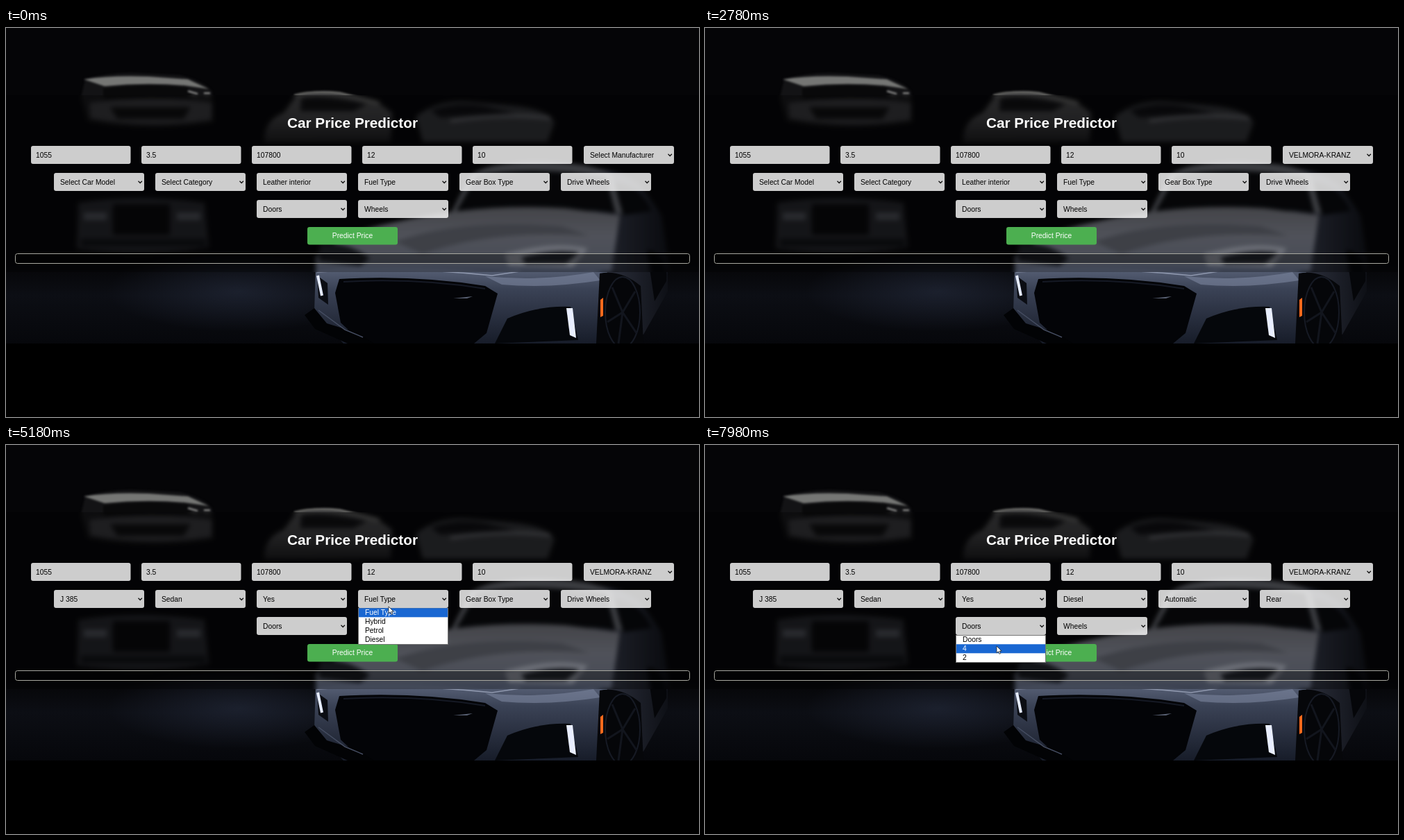
Animation of 998x561 px, one loop 8 s. Source, as an HTML page:

```html
<!DOCTYPE html>
<html lang="en">
<head>
<meta charset="utf-8">
<title>Car Price Predictor</title>
<style>
  html, body { margin: 0; width: 100%; height: 100%; overflow: hidden; background: #000; }
  svg { display: block; width: 998px; height: 561px; }
  text { font: 10.3px "Liberation Sans", Arial, sans-serif; fill: #000; white-space: pre; }
  .title { font-size: 20.75px; font-weight: bold; fill: #fff; text-anchor: middle; }
  .button { fill: #fff; text-anchor: middle; }
  .field { fill: #fff; fill-opacity: .8; }
  .chevron { fill: none; stroke: #111; stroke-width: 1.3; }
  .on { fill: #fff; }
  filter { color-interpolation-filters: sRGB; }
</style>
</head>
<body>
<svg viewBox="0 0 998 561">
  <defs>
    <linearGradient id="floor" x2="0" y2="1">
      <stop offset="0" stop-color="#050507"/><stop offset=".4" stop-color="#0c0e14"/><stop offset="1" stop-color="#06070b"/>
    </linearGradient>
    <radialGradient id="sheen">
      <stop offset="0" stop-color="#222838" stop-opacity=".7"/><stop offset="1" stop-color="#222838" stop-opacity="0"/>
    </radialGradient>
    <linearGradient id="hood" x2="0" y2="1">
      <stop offset="0" stop-color="#606167"/><stop offset=".45" stop-color="#727580"/><stop offset=".75" stop-color="#6a6f7d"/><stop offset="1" stop-color="#565d70"/>
    </linearGradient>
    <linearGradient id="bumper" x2="0" y2="1">
      <stop offset="0" stop-color="#5c657b"/><stop offset=".3" stop-color="#3b4356"/><stop offset="1" stop-color="#171c29"/>
    </linearGradient>
    <linearGradient id="side" x2="1" y2="0">
      <stop offset="0" stop-color="#343846"/><stop offset="1" stop-color="#0e1016"/>
    </linearGradient>
    <linearGradient id="backHood" x2="0" y2="1">
      <stop offset="0" stop-color="#3c3c3d"/><stop offset=".5" stop-color="#313133"/><stop offset="1" stop-color="#151517"/>
    </linearGradient>
    <filter id="soft"><feGaussianBlur stdDeviation="1.4"/></filter>
    <filter id="haze" x="-5%" y="-5%" width="110%" height="110%"><feGaussianBlur stdDeviation="3"/></filter>
    <clipPath id="stage"><rect width="998" height="455"/></clipPath>
    <clipPath id="panel"><rect y="97" width="998" height="255"/></clipPath>

    <g id="photo">
      <rect width="998" height="455" fill="#050507"/>
      <rect y="340" width="998" height="115" fill="url(#floor)"/>
      <ellipse cx="335" cy="380" rx="190" ry="58" fill="url(#sheen)"/>
      <g filter="url(#soft)">
        <!-- parked cars -->
        <path d="M114 74Q150 63 190 65L250 68Q285 76 297 92L298 136Q200 150 118 134L108 100Z" fill="#131315"/>
        <path d="M112 74Q150 68 205 70L262 74L292 88L258 83Q200 78 142 84Z" fill="#757674"/>
        <path d="M140 87Q205 79 262 86L268 100L140 103Z" fill="#09090a"/>
        <path d="M120 108Q205 96 297 108L296 132Q205 146 122 130Z" fill="#2b2b2e"/>
        <path d="M150 114H266L256 131H160Z" fill="#0c0c0d"/>
        <path d="M262 91L276 95M285 94H294" stroke="#a5a5a3" stroke-width="2"/>
        <path d="M418 98Q440 88 480 92L532 105L556 122L554 164L372 165Q370 134 400 122Z" fill="url(#backHood)"/>
        <path d="M415 97Q440 90 482 94L538 108" fill="none" stroke="#858580" stroke-width="2"/>
        <path d="M425 101Q460 95 520 110L500 120H424Z" fill="#0d0d0f"/>
        <path d="M590 128Q620 103 665 106L740 113Q782 119 790 136L780 164H600Z" fill="#27282b"/>
        <path d="M612 119Q650 105 690 113L734 123Q670 127 625 129Z" fill="#0c0c0f"/>
        <path d="M640 134Q720 122 784 130" fill="none" stroke="#515256" stroke-width="4"/>
        <path d="M104 252Q190 238 286 252L292 316Q200 331 102 318Z" fill="#1d1e22"/>
        <path d="M154 254H236V298H154Z" fill="#070709"/>
        <path d="M112 266H145V277H112ZM246 266H280V277H246Z" fill="#3a3c42"/>
        <path d="M108 304H288V315H108Z" fill="#0d0e11"/>
      </g>
      <!-- front car -->
      <path d="M842 202Q890 205 915 228L944 270L953 330V380L918 442L858 450L840 300Z" fill="url(#side)"/>
      <path d="M876 222Q912 225 930 264L888 270Z" fill="#07080b"/>
      <path d="M640 268L668 214Q690 194 760 193Q845 193 872 212L888 268Q760 250 640 268Z" fill="#55575d"/>
      <path d="M648 265L678 212Q760 199 864 214L878 267Q760 253 648 265Z" fill="#08090c"/>
      <path d="M446 330Q480 296 560 280Q680 252 806 260L884 270L872 352H446Z" fill="url(#hood)"/>
      <path d="M560 308Q660 274 800 286L840 300Q700 290 600 326Z" fill="#585b64"/>
      <path d="M452 312Q490 306 524 332L510 343L450 336Z" fill="#1a1c22"/>
      <path d="M718 326Q790 306 838 318L812 350L726 350Z" fill="#9a9eaa"/>
      <path d="M742 331Q790 317 826 324L806 340H748Z" fill="#24272f"/>
      <path d="M446 345Q630 338 866 346L860 455H486L444 410Z" fill="url(#bumper)"/>
      <path d="M690 358Q770 366 846 352L856 364Q780 376 714 370Z" fill="#7c869f" opacity=".6"/>
      <path d="M448 352Q580 344 700 357L740 351" fill="none" stroke="#8f98ae" stroke-width="1.5"/>
      <path d="M480 362Q590 356 690 372L708 383L692 440L674 455H514L482 425L474 382Z" fill="#030407"/>
      <path d="M486 366Q590 360 690 376" fill="none" stroke="#151924" stroke-width="2"/>
      <path d="M644 390L672 387L664 390Z" fill="#596173"/>
      <path d="M448 357L463 368L464 399L450 389Z" fill="#0b0d13"/>
      <path d="M449 357L455 386" fill="none" stroke="#e6ecff" stroke-width="4"/>
      <path d="M722 419Q766 400 813 402L824 450L704 455Z" fill="#05070b"/>
      <path d="M807 404H816L821 447L812 443Z" fill="#e9eeff"/>
      <path d="M430 414L444 404L462 426L508 440L530 455H492L445 434Z" fill="#020305"/>
      <path d="M450 407L488 435L514 446" fill="none" stroke="#454d61" stroke-width="1.5"/>
      <path d="M855 354Q885 348 914 372L918 455H850Z" fill="#06070a"/>
      <ellipse cx="888" cy="410" rx="25" ry="51" fill="#050609" stroke="#161a24" stroke-width="2"/>
      <path d="M888 410L873 374M888 410L906 380M888 410L866 424M888 410L908 440M888 410L882 455" stroke="#12151d" stroke-width="3"/>
      <path d="M923 320Q954 325 951 365L934 394Z" fill="#050609"/>
      <path d="M856 392L860 389V415L856 417Z" fill="#ff6a1c"/>
    </g>
  </defs>

  <rect width="998" height="561"/>
  <g clip-path="url(#stage)"><use href="#photo"/></g>
  <g clip-path="url(#panel)">
    <use href="#photo" filter="url(#haze)"/>
    <rect y="97" width="998" height="255" opacity=".3"/>
  </g>
  <rect x="13.5" y="325.5" width="971" height="14" rx="3" fill="#000" fill-opacity=".3" stroke="#a8a8a0"/>
  <text class="title" x="499" y="144">Car Price Predictor</text>
  <rect x="434" y="287" width="130" height="25.5" rx="3" fill="#4caf50"/>
  <text class="button" x="499" y="303">Predict Price</text>
  <g id="form"></g>
  <g id="ring" fill="none">
    <rect x="-.5" y="-.5" width="131" height="27" rx="3.5" stroke="#fff"/>
    <rect x=".5" y=".5" width="129" height="25" rx="2.5" stroke="#111"/>
  </g>
  <g id="menu"></g>
  <path id="cursor" d="M0 0V10L2.4 7.8L4 11.4L5.7 10.6L4.1 7.2H7.2Z" fill="#fff" stroke="#222" stroke-width=".8"/>
</svg>
<script>
const LOOP = 8000, ROW = 13, WIDTH = 130;
const get = id => document.getElementById(id);

function add(parent, tag, attrs, text = '') {
  const node = document.createElementNS('http://www.w3.org/2000/svg', tag);
  for (const key in attrs) node.setAttribute(key, attrs[key]);
  node.textContent = text;
  return parent.appendChild(node);
}

function addField(x, y, width, pad, text) {
  add(get('form'), 'rect', { class: 'field', x, y, width, height: 26, rx: 3 });
  return add(get('form'), 'text', { x: x + pad, y: y + 16.7 }, text);
}

['1055', '3.5', '107800', '12', '10'].forEach((value, i) => addField(36 + 159 * i, 170, 143.5, 7, value));

// open and pick are times in ms; blur ends the focus ring
const selects = [
  { x: 832, y: 170, open: 900, pick: 1560, blur: 2660, row: 1,
    options: ['Select Manufacturer', 'VELMORA-KRANZ', 'SORENKA', 'MIRUVA', 'KELVO', 'DRAN', 'TARQUINEL', 'QZV'] },
  { x: 69, y: 209, open: 2860, pick: 3280, blur: 3640, row: 1, options: ['Select Car Model', 'J 385', 'J 410', 'L 72'] },
  { x: 215, y: 209, open: 3640, pick: 4000, blur: 4300, row: 1, options: ['Select Category', 'Sedan', 'Hatchback', 'Coupe'] },
  { x: 361, y: 209, open: 4300, pick: 4760, blur: 5040, row: 1, options: ['Leather interior', 'Yes', 'No'] },
  { x: 507, y: 209, open: 5040, pick: 5560, blur: 6020, row: 3, options: ['Fuel Type', 'Hybrid', 'Petrol', 'Diesel'] },
  { x: 653, y: 209, open: 6020, pick: 6420, blur: 6680, row: 1, options: ['Gear Box Type', 'Automatic', 'Manual'] },
  { x: 799, y: 209, open: 6680, pick: 7140, blur: 7560, row: 1, options: ['Drive Wheels', 'Rear', 'Front', '4x4'] },
  { x: 361, y: 248, open: 7560, pick: LOOP, blur: LOOP, row: 1, options: ['Doors', '4', '2'] },
  { x: 507, y: 248, open: LOOP, pick: LOOP, blur: LOOP, row: 0, options: ['Wheels'] }
];

for (const s of selects) {
  s.label = addField(s.x, s.y, WIDTH, 9, s.options[0]);
  add(get('form'), 'path', { class: 'chevron', d: `M${s.x + 121.5} ${s.y + 11.8}l2.7 2.7l2.7 -2.7` });
  s.menu = add(get('menu'), 'g', { transform: `translate(${s.x} ${s.y + 26})` });
  add(s.menu, 'rect', { x: .5, y: .5, width: WIDTH - 1, height: s.options.length * ROW, fill: '#fff', stroke: '#777' });
  s.bar = add(s.menu, 'rect', { x: 1, width: WIDTH - 2, height: ROW, fill: '#1967d2' });
  s.items = s.options.map((text, i) => add(s.menu, 'text', { x: 10, y: i * ROW + 10.3 }, text));
}

// time, x, y of the pointer tip
const path = [
  [450, 770, 300], [850, 880, 186], [1000, 884, 188], [1240, 884, 213], [1600, 884, 214],
  [1900, 850, 232], [2600, 250, 240], [2820, 130, 224], [2920, 130, 224], [3160, 128, 253],
  [3320, 128, 253], [3580, 270, 222], [3680, 270, 222], [3900, 272, 254], [4040, 272, 254],
  [4240, 400, 224], [4340, 400, 224], [4480, 401, 247.5], [4640, 402, 254], [4800, 402, 254],
  [5000, 550, 224], [5100, 550, 224], [5420, 556, 280], [5620, 556, 280], [5900, 704, 229],
  [6060, 706, 225], [6300, 706, 254], [6460, 706, 254], [6660, 833, 221], [6760, 833, 221],
  [7020, 836, 254], [7180, 836, 254], [7500, 424, 264], [7620, 424, 264], [7860, 420, 289], [LOOP, 420, 290]
];

function pointerAt(t) {
  const i = Math.max(1, path.findIndex(p => p[0] > t));
  const [a, b] = [path[i - 1], path[i]];
  const u = Math.min(1, Math.max(0, (t - a[0]) / (b[0] - a[0])));
  const k = u * u * (3 - 2 * u);
  return [a[1] + (b[1] - a[1]) * k, a[2] + (b[2] - a[2]) * k];
}

const show = (node, on) => { node.style.display = on ? '' : 'none'; };

function draw(t) {
  const [x, y] = pointerAt(t);
  get('cursor').setAttribute('transform', `translate(${x} ${y})`);
  show(get('cursor'), t >= 450 && (t < 2640 || t >= 2820));

  const focused = selects.find(s => t >= s.pick && t < s.blur);
  show(get('ring'), focused);
  if (focused) get('ring').setAttribute('transform', `translate(${focused.x} ${focused.y})`);

  for (const s of selects) {
    s.label.textContent = s.options[t >= s.pick ? s.row : 0];
    const open = t >= s.open && t < s.pick;
    show(s.menu, open);
    if (!open) continue;
    const hover = Math.min(s.options.length - 1, Math.max(0, Math.floor((y - s.y - 26) / ROW)));
    s.bar.setAttribute('y', hover * ROW + .3);
    s.items.forEach((item, i) => item.classList.toggle('on', i === hover));
  }
}

const start = performance.now();
function tick() {
  draw((performance.now() - start) % LOOP);
  requestAnimationFrame(tick);
}
tick();
</script>
</body>
</html>
```
